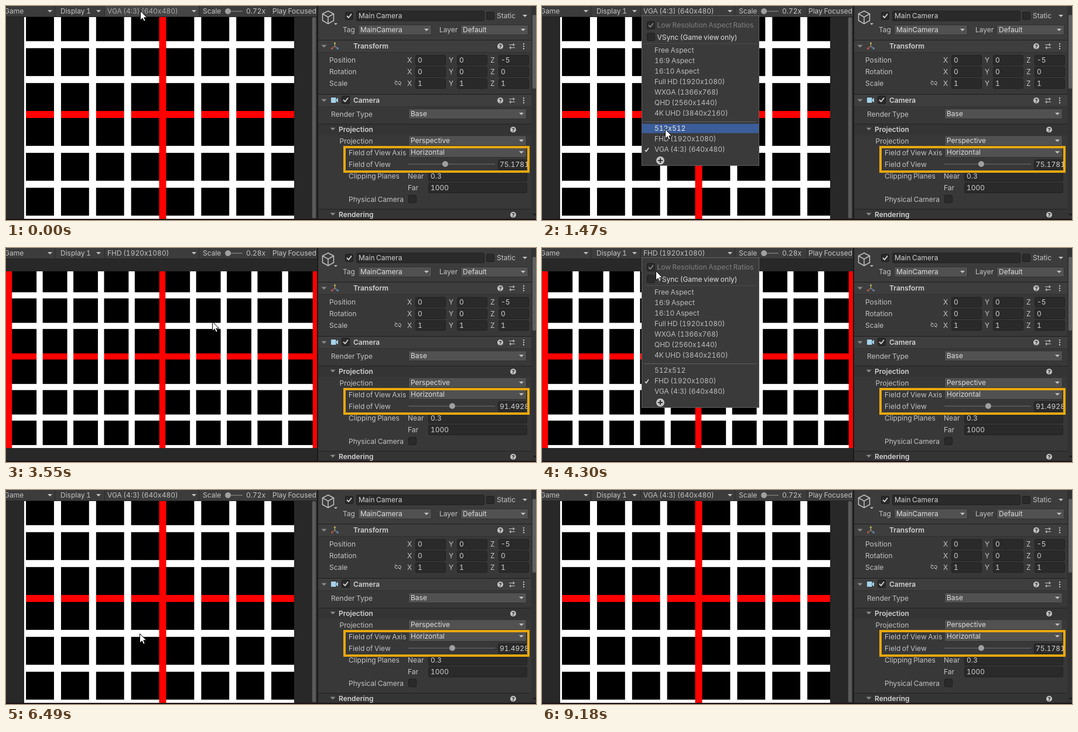
Write an HTML page that moves like this. It is 905 px wide and 367 px high and loops after 9.63 s.

```html
<!DOCTYPE html>
<html lang="en">
<head>
<meta charset="utf-8">
<title>Field of view and aspect ratio</title>
<style>
html, body { margin: 0; width: 100%; height: 100%; overflow: hidden; background: #282828; }
svg { display: block; width: 905px; height: 367px; }
text {
  font: 12px Inter, "Liberation Sans", sans-serif;
  font-variant-numeric: tabular-nums;
  word-spacing: -.7px;
  white-space: pre;
}
.bold { font-weight: 600; }
</style>
</head>
<body>
<svg id="stage" viewBox="0 0 905 367"></svg>
<script>
const LOOP = 9630, STEP = 50;
const TEXT = '#c4c4c4', BRIGHT = '#dedede', PANEL = '#383838', FIELD = '#2a2a2a', BUTTON = '#515151', EDGE = '#1d1d1d';
const svg = document.getElementById('stage');
let parent = svg;

function add(tag, attrs) {
  const el = document.createElementNS('http://www.w3.org/2000/svg', tag);
  for (const key in attrs) el.setAttribute(key, attrs[key]);
  parent.appendChild(el);
  return el;
}
function group(build) {
  const outer = parent, g = add('g', {});
  parent = g;
  build();
  parent = outer;
  return g;
}
const rect = (x, y, width, height, fill, more) => add('rect', { x, y, width, height, fill, ...more });
const path = (d, fill, more) => add('path', { d, fill, ...more });
const line = (d, stroke, width = 1) => path(d, 'none', { stroke, 'stroke-width': width });
const circle = (cx, cy, r, fill) => add('circle', { cx, cy, r, fill });
const show = (el, on) => el.setAttribute('display', on ? 'inline' : 'none');

// Text is placed by its left edge and vertical middle.
function text(x, mid, str, more) {
  const el = add('text', { x, y: mid + 4, fill: TEXT, ...more });
  el.textContent = str;
  return el;
}
const bold = (x, mid, str) => text(x, mid, str, { class: 'bold', fill: '#d2d2d2' });
const arrow = (x, y, fill = TEXT, r = 4) => path(`M${x - r} ${y - r / 2}h${2 * r}l${-r} ${r}z`, fill);
const tick = (x, y, fill) =>
  path(`M${x + 3} ${y + 7}l3 3 5-6.5`, 'none', { stroke: fill, 'stroke-width': 1.8 });

function field(x, mid, width, str) {
  rect(x + .5, mid - 8.5, width - 1, 17, FIELD, { rx: 2, stroke: '#212121' });
  return text(x + 4, mid, str, { fill: '#d2d2d2' });
}
function dropdown(x, mid, width, str) {
  rect(x + .5, mid - 8.5, width - 1, 17, BUTTON, { rx: 2, stroke: '#303030' });
  text(x + 4, mid, str, { fill: BRIGHT });
  arrow(x + width - 9, mid);
}
function checkbox(x, y, on, color = '#d8d8d8') {
  rect(x + .5, y + .5, 13, 13, FIELD, { rx: 2, stroke: EDGE });
  if (on) tick(x, y, color);
}
function help(x, y) {
  circle(x, y, 5, TEXT);
  text(x, y - .5, '?', { fill: PANEL, 'text-anchor': 'middle', style: 'font-size:9px;font-weight:800' });
}
function headerIcons(y) {
  help(844, y);
  line(`M859 ${y - 2.5}h10M859 ${y + 2.5}h10M866.5 ${y - 5}v5M861.5 ${y}v5`, TEXT, 1.2);
  for (const d of [-4, 0, 4]) circle(884, y + d, 1.2, TEXT);
}

// Grid seen by the camera: white bars with red axes, clipped to the view.
function grid(left, top, right, bottom, cx, gap, bar, redAt) {
  const cy = 186;
  function span(mid, low, high, paint) {
    const a = Math.max(low, mid - bar / 2), b = Math.min(high, mid + bar / 2);
    if (b > a) paint(a, b - a);
  }
  const column = (i, color) =>
    span(cx + i * gap, left, right, (x, w) => rect(x, top, w, bottom - top, color));
  const row = (i, color) =>
    span(cy + i * gap, top, bottom, (y, h) => rect(left, y, right - left, h, color));
  rect(left, top, right - left, bottom - top, '#000');
  for (let i = -4; i <= 4; i++) row(i, i ? '#fff' : '#f00');
  for (let i = -5; i <= 5; i++) if (i % redAt) column(i, '#fff');
  for (let i = -redAt; i <= redAt; i += redAt) column(i, '#f00');
}

// Game view
rect(0, 0, 532, 367, '#282828');
const vgaView = group(() => {
  grid(31, 19, 492, 365, 267.5, 59.85, 12, 10);
  rect(522, 19, 9, 346, '#313131');
  rect(523, 19, 6, 345, '#5a5a5a', { rx: 3 });
});
const fhdView = group(() => grid(0, 40, 531, 343, 267, 52.4, 10.5, 5));

// Toolbar
rect(0, 0, 532, 18, '#3c3c3c');
rect(0, 18, 532, 1, '#232323');
const sizeHover = rect(169, 0, 160, 18, '#464646');
for (const x of [83, 168, 329, 452]) rect(x, 0, 1, 18, '#2a2a2a');
text(-3, 9, 'Game');
arrow(75, 9);
text(93, 9, 'Display 1');
arrow(158, 9);
const sizeLabel = text(173, 9, '');
arrow(321, 9);
text(336, 9, 'Scale');
rect(375, 8, 29, 2, '#6a6a6a');
circle(379, 9, 5, '#a0a0a0');
const zoomLabel = text(410, 9, '');
text(455, 9, 'Play Focused');

// Inspector
rect(531, 0, 374, 367, PANEL);
rect(531, 0, 2, 367, '#191919');
rect(533, 0, 364, 58, '#3c3c3c');
line('M550 8.5l9.5 5v11.5l-9.5 5.5-9.5-5.5v-11.5zM540.5 13.5l9.5 5.5 9.5-5.5M550 19v11.5', TEXT, 1.5);
arrow(563, 31, TEXT, 3);
checkbox(579, 10, true);
field(598, 17, 219, 'Main Camera');
checkbox(820, 10, false);
text(838, 17, 'Static');
arrow(886, 17);
text(575, 41, 'Tag');
dropdown(601, 41, 126, 'MainCamera');
text(740, 41, 'Layer');
dropdown(776, 41, 116, 'Default');

function header(y, title, x) {
  rect(533, y - 11, 364, 1, EDGE);
  rect(533, y - 10, 364, 20, '#3e3e3e');
  rect(533, y + 10, 364, 1, '#303030');
  arrow(543, y, '#8a8a8a', 4.5);
  bold(x, y, title);
  headerIcons(y);
}
header(69, 'Transform', 593);
line('M561.5 69v-5', '#b9b45a', 1.2);
line('M561.5 69l-4 3', '#d0624c', 1.2);
line('M561.5 69l4 3', '#6c9cc0', 1.2);
path('M561.5 61.5l2 3.5h-4z', '#b9b45a');
path('M555 74.5l1-3.8 2.8 2.8z', '#d0624c');
path('M568 74.5l-3.8-1 2.8-2.8z', '#6c9cc0');

['Position', 'Rotation', 'Scale'].forEach((name, i) => {
  const y = 93 + 20 * i, value = String(i >> 1);
  text(552, y, name);
  ['X', 'Y', 'Z'].forEach((axis, k) => {
    text(685 + 71 * k, y, axis);
    field(699 + 71 * k, y, 52, i === 0 && k === 2 ? '-5' : value);
  });
});
line('M668 129.5h-1.5a2.5 2.5 0 0 0 0 5h2M670.5 129.5h1.5a2.5 2.5 0 0 1 0 5h-1.5M664.5 127.5l9.5 9', TEXT);

header(162, 'Camera', 593);
rect(555, 157, 8.5, 9, '#a5d3ea', { rx: 1 });
path('M564 160l3-2.5v8l-3-2.5z', '#a5d3ea');
checkbox(573, 154, true);
text(555, 186, 'Render Type');
dropdown(687, 185, 202, 'Base');

function section(y, title) {
  rect(533, y - 10, 364, 1, '#222');
  rect(533, y - 9, 364, 18, '#343434');
  arrow(558, y - 1, '#8a8a8a', 4.5);
  bold(568, y, title);
  help(866, y);
}
section(212, 'Projection');
text(569.5, 232, 'Projection');
dropdown(687, 231, 202, 'Perspective');
text(585, 252, 'Field of View Axis');
dropdown(687, 251, 202, 'Horizontal');
text(585, 272, 'Field of View');
rect(687, 270.5, 148, 1.5, '#5e5e5e');
const knob = circle(750, 271, 5, '#a0a0a0');
const fovLabel = field(840, 272, 49, '');
fovLabel.setAttribute('x', 843);
text(585, 292, 'Clipping Planes');
text(686, 292, 'Near');
field(721, 292, 169, '0.3');
text(686, 312, 'Far');
field(721, 312, 169, '1000');
text(585, 332, 'Physical Camera');
checkbox(687, 324, false);
section(358, 'Rendering');
rect(578, 242, 314, 42, 'none', { stroke: '#eaa80f', 'stroke-width': 4 });

// Scroll bar
rect(897, 0, 8, 367, '#323232');
rect(899, 15, 6, 127, '#5f5f5f', { rx: 3 });
arrow(903, 358, '#151515', 3);
rect(0, 365, 905, 2, '#1b1216');

// Size menu
const SIZES = ['Free Aspect', '16:9 Aspect', '16:10 Aspect', 'Full HD (1920x1080)', 'WXGA (1366x768)',
  'QHD (2560x1440)', '4K UHD (3840x2160)', '512x512', 'FHD (1920x1080)', 'VGA (4:3) (640x480)'];
const sizeY = i => 76 + 18 * i + (i > 6 ? 8 : 0);
let hoverBar, mark, items;
const menu = group(() => {
  rect(170.5, 16.5, 200, 257, '#3a3a3a', { stroke: '#636363' });
  checkbox(179, 26, true, '#858585');
  text(196.5, 33, 'Low Resolution Aspect Ratios', { fill: '#808080' });
  checkbox(179, 46, false);
  text(196.5, 54, 'VSync (Game view only)', { fill: BRIGHT });
  rect(174, 64, 192, 1, '#4c4c4c');
  rect(174, 198, 192, 1, '#606060');
  hoverBar = rect(171, 0, 199, 16, '#3b5d99');
  items = SIZES.map((name, i) => text(192, sizeY(i), name));
  mark = line('M176 0l2 2.5 4-6', BRIGHT, 1.5);
  circle(202, 265, 7, TEXT);
  line('M198 265h8M202 261v8', '#333', 2);
});

const halo = circle(0, 0, 12, 'rgb(255,243,60)');
halo.setAttribute('opacity', .52);
const cursor = path('M.5 .5V16.2L4.2 12.8 6.6 18.3 9.2 17.2 6.8 11.8H11.8Z', '#fff', { stroke: '#000' });

// Pointer moves: start time, then [step, x, y] keys.
const MOVES = [
  [0, [[0, 229, 8]]],
  [1020, [[0, 229, 8], [1, 230, 5], [3, 222, 80], [6, 212, 165], [11, 209, 223]]],
  [1720, [[1, 210, 223]]],
  [2390, [[1, 210, 224], [2, 210, 225]]],
  [2660, [[0, 210, 225], [4, 430, 262], [8, 640, 286], [10, 668, 288], [13, 610, 250],
    [16, 460, 180], [18, 352, 126], [19, 257, 32]]],
  [3650, [[0, 257, 32], [2, 215, 12], [4, 193, 6], [6, 186, 5]]],
  [4220, [[0, 186, 5], [5, 205, 90], [11, 222, 205], [16, 228, 246]]],
  [8060, [[0, 228, 246], [2, 300, 238], [4, 430, 244], [8, 690, 300], [10, 790, 316], [14, 872, 271]]],
  [9080, [[1, 700, 318], [2, 522, 352], [3, 522, 400]]]
];
const CLICKS = [[710, 810], [1890, 2040], [4050, 4150], [5170, 5270], [6390, 6490]];
const within = (t, a, b) => t >= a && t < b;

function pointer(t) {
  const [start, keys] = MOVES.filter(m => t >= m[0]).pop();
  const step = Math.floor((t - start) / STEP) + 1;
  const next = keys.findIndex(k => k[0] >= step);
  if (next < 0) return keys[keys.length - 1].slice(1);
  if (next === 0) return keys[0].slice(1);
  const a = keys[next - 1], b = keys[next], u = (step - a[0]) / (b[0] - a[0]);
  return [1, 2].map(i => Math.round(a[i] + (b[i] - a[i]) * u));
}

function draw(t) {
  const [x, y] = pointer(t);
  const wide = within(t, 1890, 5170);
  const updated = within(t, 2960, 8320);
  const current = wide ? 8 : 9;
  const hovered = t < 710;

  show(vgaView, !wide);
  show(fhdView, wide);
  show(sizeHover, hovered);
  sizeLabel.setAttribute('fill', hovered ? '#a8a8a8' : TEXT);
  sizeLabel.textContent = SIZES[current];
  zoomLabel.textContent = wide ? '0.28x' : '0.72x';
  fovLabel.textContent = updated ? '91.4928' : '75.1781';
  knob.setAttribute('cx', updated ? 762 : 750);

  show(menu, within(t, 710, 1890) || within(t, 4050, 5170));
  const hover = SIZES.findIndex((_, i) => Math.abs(y - sizeY(i)) <= 9);
  show(hoverBar, hover >= 0);
  if (hover >= 0) hoverBar.setAttribute('y', sizeY(hover) - 8);
  items.forEach((item, i) => item.setAttribute('fill', i === hover ? '#ececec' : '#bdbdbd'));
  mark.setAttribute('transform', `translate(0 ${sizeY(current) + 1})`);

  const place = `translate(${x} ${y})`;
  cursor.setAttribute('transform', place);
  halo.setAttribute('transform', place);
  show(halo, CLICKS.some(([a, b]) => within(t, a, b)));
}

const begin = performance.now();
function animate() {
  draw((performance.now() - begin) % LOOP);
  requestAnimationFrame(animate);
}
animate();
</script>
</body>
</html>
```
